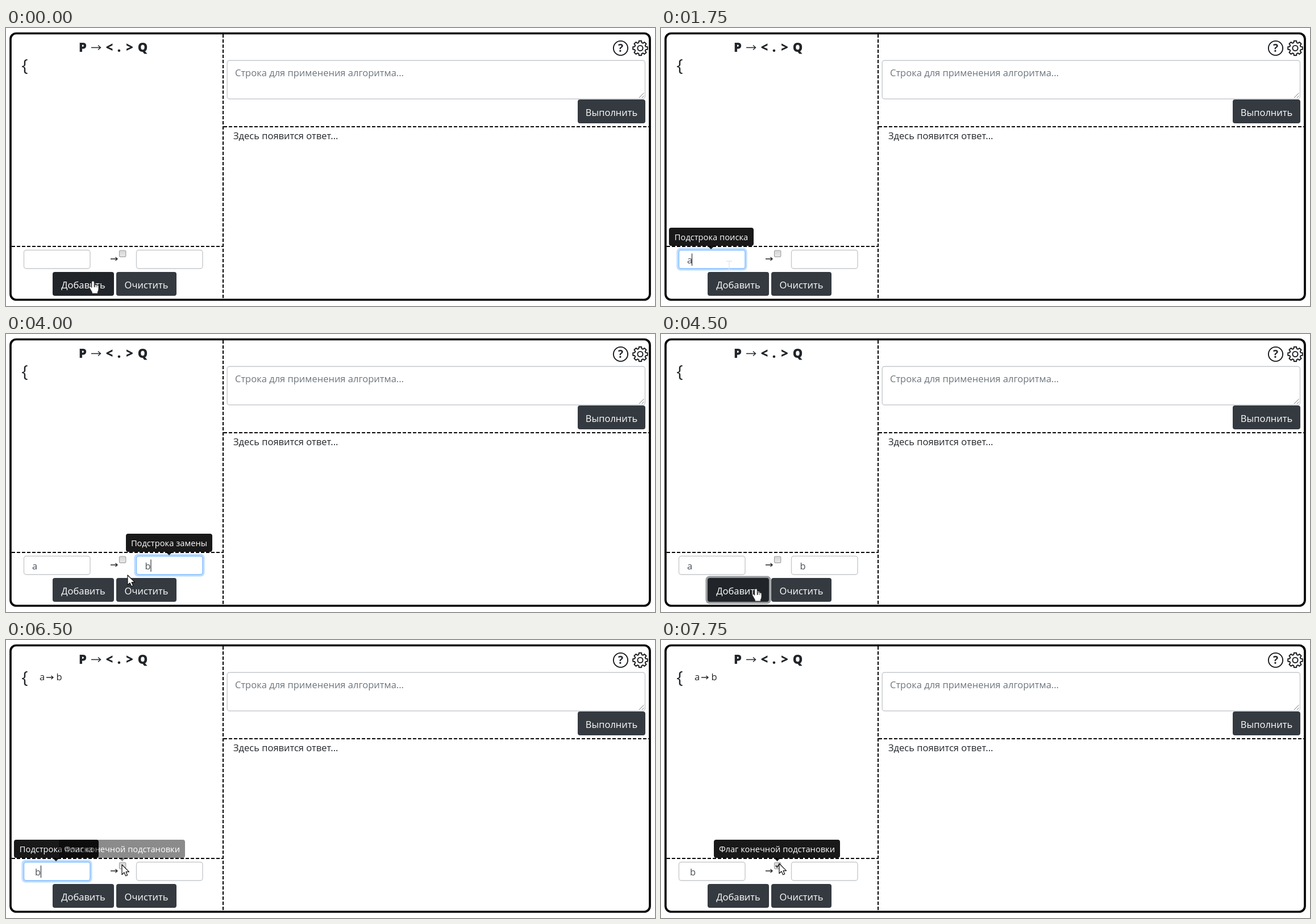
Write an HTML page that moves like this. It is 1142x490 px and loops after 8 s.

```html
<!DOCTYPE html>
<html lang="ru">
<head>
<meta charset="utf-8">
<title>Алгоритм</title>
<style>
  html, body { margin: 0; width: 100%; height: 100%; overflow: hidden; background: #fff; }
  svg { display: block; width: 100%; height: 100%; }
  text { font: 16.5px "Open Sans", "Noto Sans", sans-serif; fill: #212529; white-space: pre; }
  .mid { text-anchor: middle; }
  .head text { font-size: 22px; font-weight: 800; }
  .dash { stroke: #000; stroke-width: 2; stroke-dasharray: 6 3; }
  .field { fill: #fff; stroke: #c6cace; stroke-width: 1.4; }
  .button { fill: #343a40; }
  .light { fill: #fff; }
  .value { fill: #495057; }
  .line { fill: none; stroke: #212529; stroke-width: 1.4; }
  .tip text { font-size: 14.7px; fill: #fff; }
  .icon { fill: none; stroke: #16181b; stroke-width: 1.9; stroke-linejoin: round; }
</style>
</head>
<body>
<svg id="stage" viewBox="0 0 1142 490">
  <defs>
    <linearGradient id="box" x2="0" y2="1">
      <stop stop-color="#d4d4d4"/><stop offset="1" stop-color="#eaeaea"/>
    </linearGradient>
    <path id="arrow" class="line" d="M0 0H12M8.5 -3L12 0L8.5 3"/>
  </defs>

  <rect x="8" y="9.5" width="1125" height="469.5" rx="10" fill="#fff" stroke="#000" stroke-width="3.7"/>
  <path class="dash" d="M382 11V478"/>
  <path class="dash" d="M10 385H382"/>
  <path class="dash" d="M383 174H1131"/>

  <g class="head mid">
    <text x="135" y="42">P</text>
    <path class="line" d="M150 34.5H166M162 30.5L166.5 34.5L162 38.5"/>
    <text x="182" y="42">&lt;</text>
    <text x="199" y="42">.</text>
    <text x="217.5" y="42">&gt;</text>
    <text x="240.5" y="42">Q</text>
  </g>
  <text class="mid" x="33" y="76" style="font-size:30px;font-weight:500">{</text>
  <g id="rule">
    <text x="59" y="71">a</text>
    <use href="#arrow" x="71" y="66"/>
    <text x="88.5" y="71">b</text>
  </g>

  <circle class="icon" cx="1081.5" cy="35.5" r="12.6"/>
  <text class="mid" x="1081.5" y="42" style="font-size:19px;font-weight:700">?</text>
  <path id="gear" class="icon"/>
  <circle class="icon" cx="1116" cy="35.5" r="4.6"/>

  <rect class="field" x="389.2" y="57.2" width="735.3" height="67.8" rx="4"/>
  <text x="403" y="85" style="fill:#6c757d">Строка для применения алгоритма...</text>
  <path d="M1114 123L1122.500 114.500M1119 123L1122.500 119.500" stroke="#777" stroke-width="1"/>
  <text x="400" y="196">Здесь появится ответ...</text>

  <g id="controls"></g>
  <use href="#arrow" x="184" y="407"/>
  <rect x="199.500" y="392" width="11.300" height="11.300" rx="2" fill="url(#box)" stroke="#a3a3a3" stroke-width="1.200"/>
  <path id="tick" d="M201.800 397.500L204.300 400.300L209 394.300" fill="none" stroke="#444" stroke-width="2.200"/>
  <path id="caret" stroke="#333" stroke-width="1.200"/>
  <g id="tips"></g>

  <g id="cursors" stroke-linejoin="round">
    <path id="hand" fill="#fff" stroke="#222" stroke-width=".9" d="M5 0c-1.400 0-2.200 1-2.200 2.200v9.300L1.600 10C.6 9-1 9.300-1.300 10.400c-.3 1 .4 1.800 1 2.800l3.600 6.300V22h10v-2.600c1-1.800 1.700-3.500 1.700-6V9c0-2.400-3-2.600-3.200-.9c-.2-2-3-2.200-3.300-.3c-.2-1.400-1.300-1.400-1.300-.2V2.200C7.200 1 6.400 0 5 0zM7.200 7.600V11M8.500 8V11M11.800 8.500V11"/>
    <path id="beam" fill="none" stroke="#e6e4e4" stroke-width="1.300" d="M-5 -8H-1L0 -7L1 -8H5M0 -7V7M-5 8H-1L0 7L1 8H5"/>
    <path id="pointer" fill="#fff" stroke="#111" stroke-width="1.200" d="M0 0V17.500l4-3.700 2.700 6 3-1.300-2.600-5.800H12.500z"/>
  </g>
</svg>
<script>
const LOOP = 8000;
const $ = id => document.getElementById(id);

function add(parent, tag, attrs, content = '') {
  const el = document.createElementNS('http://www.w3.org/2000/svg', tag);
  for (const key in attrs) el.setAttribute(key, attrs[key]);
  el.textContent = content;
  return parent.appendChild(el);
}

function mix(from, to, amount) {
  return `rgb(${from.map((c, i) => Math.round(c + (to[i] - c) * amount))})`;
}

function makeRing(x, y, w, h, color) {
  return add($('controls'), 'rect', {
    x: x - 3.6, y: y - 3.6, width: w + 7.2, height: h + 7.2, rx: 7, fill: color
  });
}

function makeButton(x, y, w, label) {
  const ring = makeRing(x, y, w, 42, '#9a9da0');
  const face = add($('controls'), 'rect', { class: 'button', x, y, width: w, height: 42, rx: 4 });
  add($('controls'), 'text', { class: 'mid light', x: x + w / 2, y: y + 28.5 }, label);
  ring.style.opacity = 0;
  return { ring, face };
}

function makeInput(x) {
  const ring = makeRing(x, 391, 117, 33, '#bfdeff');
  const face = add($('controls'), 'rect', { class: 'field', x: x + .5, y: 391.5, width: 116.5, height: 32.5, rx: 4 });
  const text = add($('controls'), 'text', { class: 'value', y: 415 });
  return { ring, face, text };
}

function makeTip(left, right, center, label) {
  const tip = add($('tips'), 'g', { class: 'tip' });
  add(tip, 'path', {
    d: `M${left + 4} 352H${right - 4}q4 0 4 4V380q0 4 -4 4H${center + 6}l-6 6l-6 -6H${left + 4}q-4 0 -4 -4V356q0 -4 4 -4z`,
    'fill-opacity': .9
  });
  add(tip, 'text', { class: 'mid', x: (left + right) / 2, y: 374 }, label);
  return tip;
}

function gearPath(cx, cy, teeth) {
  const points = [];
  for (let i = 0; i < teeth; i++) {
    for (const [r, offset] of [[10, -.27], [13, -.17], [13, .17], [10, .27]]) {
      const angle = i * 2 * Math.PI / teeth - Math.PI / 2 + offset;
      points.push((cx + r * Math.cos(angle)).toFixed(2) + ' ' + (cy + r * Math.sin(angle)).toFixed(2));
    }
  }
  return 'M' + points.join('L') + 'Z';
}

$('gear').setAttribute('d', gearPath(1116, 35.5, 8));
makeButton(1006, 126, 119, 'Выполнить');
makeButton(194, 430, 106, 'Очистить');
const addButton = makeButton(82, 430, 108, 'Добавить');
const inputs = [makeInput(31), makeInput(229)];
const tips = [
  makeTip(14, 163, 88, 'Подстрока поиска'),
  makeTip(211, 363, 287, 'Подстрока замены'),
  makeTip(93, 315, 204.5, 'Флаг конечной подстановки')
];

// Each step lists only what changes at its time.
const steps = [
  [0, { cursor: ['hand', 148, 446], hover: 1, press: 0, tips: [0, 0, 0], focus: [0, 0],
        texts: ['', ''], left: 46, caret: 0, rule: false, checked: false }],
  [250, { cursor: ['hand', 141, 434] }],
  [500, { cursor: ['beam', 122, 420], hover: .4, tips: [.6, 0, 0] }],
  [750, { cursor: ['beam', 120, 419], hover: 0, tips: [1, 0, 0] }],
  [1000, { focus: [.5, 0], caret: 46 }],
  [1250, { focus: [1, 0] }],
  [1750, { texts: ['a', ''], caret: 54.5 }],
  [2250, { cursor: ['beam', 143, 416] }],
  [2500, { cursor: ['pointer', 200, 408] }],
  [2750, { cursor: ['beam', 257, 416], tips: [.45, 1, 0], focus: [.3, .5], caret: 244.5 }],
  [3000, { tips: [0, 1, 0], focus: [0, 1] }],
  [3250, { texts: ['a', 'b'], caret: 255 }],
  [4000, { cursor: ['pointer', 214, 425] }],
  [4250, { cursor: ['hand', 163, 448], hover: 1 }],
  [4500, { cursor: ['hand', 162, 449], press: 1, tips: [0, 0, 0], focus: [0, 0], caret: 0 }],
  [4750, { texts: ['', ''], rule: true, left: 51 }],
  [5250, { cursor: ['hand', 141, 438] }],
  [5500, { cursor: ['beam', 125, 426], hover: .5, press: .4, tips: [1, 0, 0], focus: [.4, 0], caret: 51 }],
  [5750, { cursor: ['beam', 124, 422], hover: 0, press: 0, focus: [1, 0] }],
  [6000, { texts: ['b', ''], caret: 61.5 }],
  [6250, { cursor: ['pointer', 180, 405] }],
  [6500, { cursor: ['pointer', 204, 396], tips: [1, 0, .5] }],
  [6750, { cursor: ['pointer', 208, 394], tips: [1, 0, 1] }],
  [7750, { tips: [0, 0, 1], focus: [0, 0], caret: 0, checked: true }]
];

function stateAt(time) {
  return Object.assign({}, ...steps.filter(([start]) => start <= time).map(step => step[1]));
}

function show(el, visible) {
  el.style.display = visible ? '' : 'none';
}

function draw(now) {
  const s = stateAt(now % LOOP);
  inputs.forEach((input, i) => {
    input.ring.style.opacity = s.focus[i] ** 1.5;
    input.face.style.stroke = mix([198, 202, 206], [128, 189, 255], Math.min(1, s.focus[i] * 1.5));
    input.text.textContent = s.texts[i];
    input.text.setAttribute('x', i ? 244.5 : s.left);
  });
  tips.forEach((tip, i) => tip.style.opacity = s.tips[i]);
  addButton.ring.style.opacity = s.press;
  addButton.face.style.fill = mix([52, 58, 64], [33, 37, 41], s.hover);
  show($('rule'), s.rule);
  show($('tick'), s.checked);
  show($('caret'), s.caret);
  $('caret').setAttribute('d', `M${s.caret} 397.5V419`);
  const [kind, x, y] = s.cursor;
  for (const cursor of $('cursors').children) show(cursor, cursor.id === kind);
  $('cursors').setAttribute('transform', `translate(${x} ${y})`);
  requestAnimationFrame(draw);
}

draw(0);
</script>
</body>
</html>
```
